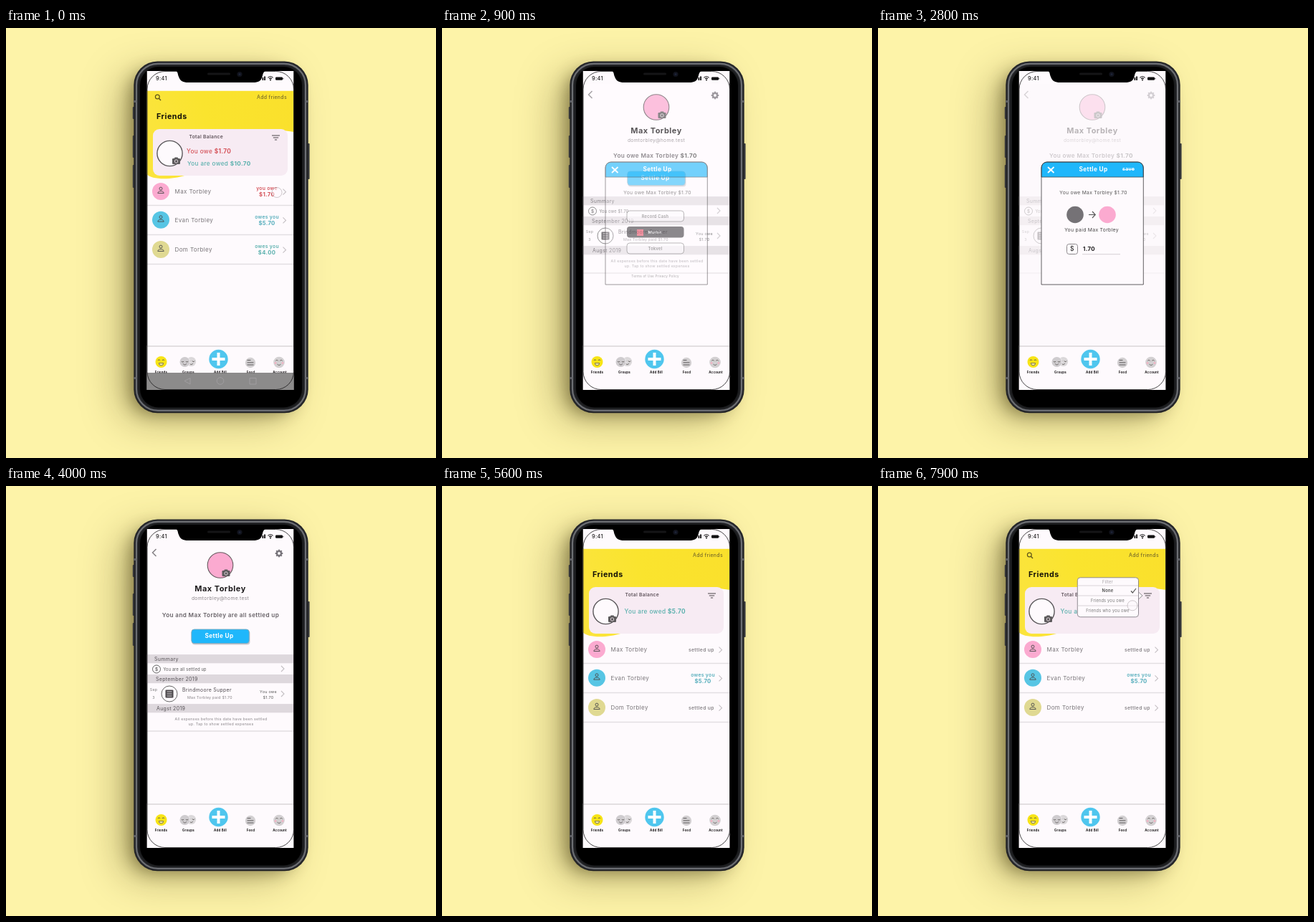
An HTML page with a canvas that plays this animation: 600 px wide and 600 px high, repeating every 8000 ms.

```html
<!DOCTYPE html>
<html lang="en">
<head>
<meta charset="utf-8">
<title>Bill sharing app</title>
<style>
html, body { margin: 0; width: 100%; height: 100%; overflow: hidden; background: #fdf3a8; }
canvas { display: block; width: 100vmin; height: 100vmin; }
</style>
</head>
<body>
<canvas id="stage"></canvas>
<script>
const SIZE = 600, LOOP = 8000, STEP = 100;
const FONT = "Inter, 'Open Sans', sans-serif";
const PAPER = '#fefafd', BLUE = '#1fb7fb', PINK = '#fbaad0', RED = '#d5535a', TEAL = '#5ab0ad';
const MAX = 'Max Torbley', EVAN = 'Evan Torbley', DOM = 'Dom Torbley';

const dpr = window.devicePixelRatio || 1;
const makeCanvas = el => {
  el.width = el.height = SIZE * dpr;
  const g = el.getContext('2d');
  g.scale(dpr, dpr);
  return g;
};
const stage = makeCanvas(document.getElementById('stage'));
const buffer = makeCanvas(document.createElement('canvas'));
const backdrop = makeCanvas(document.createElement('canvas'));
let c = stage;

const ramp = (t, from, to) => Math.min(1, Math.max(0, (t - from) / (to - from)));

// Drawing helpers
function paint(fill, stroke, width = 1) {
  if (fill) { c.fillStyle = fill; c.fill(); }
  if (stroke) { c.strokeStyle = stroke; c.lineWidth = width; c.stroke(); }
}
function circle(x, y, r, fill, stroke, width) {
  c.beginPath();
  c.arc(x, y, r, 0, Math.PI * 2);
  paint(fill, stroke, width);
}
function box(x, y, w, h, r, fill, stroke, width) {
  c.beginPath();
  c.roundRect(x, y, w, h, r);
  paint(fill, stroke, width);
}
function line(points, color, width = 1, fill) {
  c.beginPath();
  for (let i = 0; i < points.length; i += 2) c.lineTo(points[i], points[i + 1]);
  paint(fill, color, width);
}
function arc(x, y, r, from, to, color, width = 0.8) {
  c.beginPath();
  c.arc(x, y, r, from * Math.PI, to * Math.PI);
  paint(null, color, width);
}
function text(str, x, y, size, color = '#666', weight = 400, align = 'left') {
  c.font = `${weight} ${size * 0.96}px ${FONT}`;
  c.letterSpacing = size * 0.043 + 'px';
  c.textAlign = align;
  c.fillStyle = color;
  c.fillText(str, x, y + size * 0.34);
  return x + c.measureText(str).width;
}
const mid = (str, x, y, size, color, weight) => text(str, x, y, size, color, weight, 'center');

function layer(alpha, draw) {
  if (alpha <= 0) return;
  buffer.clearRect(0, 0, SIZE, SIZE);
  c = buffer;
  draw();
  c = stage;
  c.globalAlpha = alpha;
  c.drawImage(buffer.canvas, 0, 0, SIZE, SIZE);
  c.globalAlpha = 1;
}

// Icons
const chevron = (x, y, s = 4, dir = 1, color = '#c4bfc3', w = 1.1) =>
  line([x - dir * s / 2, y - s, x + dir * s / 2, y, x - dir * s / 2, y + s], color, w);

function camera(x, y, color = '#5d5a5c') {
  box(x - 5.5, y - 3.5, 11, 8, 1.2, color);
  box(x - 2.5, y - 5, 5, 3, 1, color);
  circle(x, y + 0.5, 2.2, null, '#e9dde4', 0.9);
}
function person(x, y) {
  circle(x, y - 2.9, 2, null, '#4a4a4a', 0.9);
  c.beginPath();
  c.moveTo(x - 4.2, y + 3.5);
  c.bezierCurveTo(x - 4.2, y - 0.4, x + 4.2, y - 0.4, x + 4.2, y + 3.5);
  c.closePath();
  paint(null, '#4a4a4a', 0.9);
}
function gear(x, y) {
  for (let i = 0; i < 4; i++) {
    const a = i * Math.PI / 4, dx = Math.cos(a) * 5.3, dy = Math.sin(a) * 5.3;
    line([x - dx, y - dy, x + dx, y + dy], '#77737a', 2.2);
  }
  circle(x, y, 3, PAPER, '#77737a', 2.2);
}
function face(x, y, r, fill, { openEyes = true, laugh = false } = {}) {
  circle(x, y, r, fill);
  const ink = '#5a5553', turn = openEyes ? [1.1, 1.9] : [0.1, 0.9];
  for (const dx of [-3, 3]) arc(x + dx, y - 1.5, 1.6, ...turn, ink, 0.9);
  if (laugh) {
    c.beginPath();
    c.arc(x, y + 1.7, 3.1, 0, Math.PI);
    c.closePath();
    paint('#fff6a0', ink, 0.8);
  } else arc(x, y + 1.6, 2.4, 0.1, 0.9, ink);
}

// Phone body and shadow, drawn once
function drawBackdrop() {
  c = backdrop;
  c.fillStyle = '#fdf3a8';
  c.fillRect(0, 0, SIZE, SIZE);
  const shadows = [[-24, 14, 56, 0.36], [-11, 7, 22, 0.46], [-2, 1, 5, 0.25]];
  for (const [dx, dy, blur, a] of shadows) {
    c.shadowColor = `rgba(64,54,14,${a})`;
    c.shadowBlur = blur * dpr;
    c.shadowOffsetX = dx * dpr;
    c.shadowOffsetY = dy * dpr;
    box(184, 52, 232, 480, 30, '#222');
  }
  c.shadowColor = 'transparent';
  const metal = '#3a3b3e';
  for (const [y, h] of [[110, 17], [150, 31], [191, 32]]) box(176.8, y, 3, h, 1, metal);
  box(421, 161, 2.6, 50, 1, metal);
  box(178.3, 46.5, 243.4, 490.7, 33, '#252629');
  box(182, 49.8, 236, 484, 30, null, '#6c6e73', 2.2);
  box(184.6, 52.2, 230.8, 479.2, 28, '#1b1c1e');
  box(187, 54, 226, 475.6, 26, '#000');
  for (const y of [101, 487]) {
    c.fillStyle = '#626367';
    c.fillRect(178.3, y, 4, 3);
    c.fillRect(417.7, y, 4, 3);
  }
}

function drawGlass() {
  box(197, 60.5, 204.5, 444, 25, null, '#1b1a1b', 0.8);
  c.beginPath();
  c.moveTo(234, 59);
  c.bezierCurveTo(241, 60, 239, 64, 241, 68);
  c.bezierCurveTo(243, 74, 247, 76, 254, 76);
  c.lineTo(345, 76);
  c.bezierCurveTo(352, 76, 356, 74, 357.5, 68);
  c.bezierCurveTo(359, 64, 358, 60, 366, 59);
  paint('#000');
  box(281, 62.5, 32, 3, 1.5, '#151517');
  circle(326, 64.5, 3.6, '#11131c');
  circle(326, 64.5, 1.5, '#1d2337');
}

function status() {
  text('9:41', 209, 70.5, 7.7, '#222', 500);
  c.fillStyle = '#111';
  c.fillRect(357.5, 69, 1.8, 4);
  c.fillRect(360.2, 67.5, 1.8, 5.5);
  circle(369, 72.5, 1, '#111');
  arc(369, 72.8, 2.7, 1.25, 1.75, '#111', 1.1);
  arc(369, 72.8, 5, 1.25, 1.75, '#111', 1.1);
  box(376, 68.5, 10, 4.2, 1.3, '#111');
  c.fillRect(386.4, 69.8, 0.9, 1.6);
}

function tabBar() {
  c.fillStyle = PAPER;
  c.fillRect(196.5, 443, 205, 62);
  line([197, 444, 401, 444], '#dad6d9', 1.3);
  face(216.5, 466, 8, '#f7e416', { laugh: true });
  face(258.5, 465.5, 6.6, '#dbd8da', { openEyes: false });
  circle(249.5, 466, 7.6, PAPER);
  face(249.5, 466, 7, '#cfcccf', { openEyes: false });
  circle(296.5, 462, 13.2, '#4fc6ee');
  line([287.5, 462, 305.5, 462], '#fff', 4);
  line([296.5, 453, 296.5, 471], '#fff', 4);
  circle(341, 467, 7.2, '#d3d0d2');
  for (const [y, w] of [[463.5, 5], [466.8, 9], [470, 9]]) line([336.5, y, 336.5 + w, y], '#5d5a5c', 1);
  face(381, 466.5, 7.8, '#d3d0d2');
  for (const dx of [-5, 5]) circle(381 + dx, 467.5, 1.4, '#f0b3c4');
  const labels = [['Friends', 216.5], ['Groups', 254.5], ['Add Bill', 299], ['Feed', 341.5], ['Account', 382]];
  for (const [s, x] of labels) mid(s, x, 480.7, 4.6, '#1c1a1b', 700);
}

function blankScreen() {
  c.fillStyle = PAPER;
  c.fillRect(196.5, 60, 205, 445);
  status();
}

function systemBar() {
  c.fillStyle = 'rgba(112,112,112,.8)';
  c.fillRect(196.5, 481, 205, 24);
  const ink = '#a09da0';
  line([257, 488.5, 249, 492.5, 257, 497, 257, 488.5], ink, 1);
  circle(299, 492.5, 4.8, null, ink, 1);
  box(340, 488.5, 9, 8.5, 0, null, ink, 1);
}

function search() {
  circle(211.3, 96, 2.9, null, '#5f5518', 1.2);
  line([213.4, 98.2, 216, 101], '#5f5518', 1.4);
}

function amount(label, value, y, color) {
  mid(label, 364, y - 4.5, 7.1, color, 600);
  mid(value, 364, y + 4, 8, color, 700);
}
const settled = y => text('settled up', 344, y + 1, 7.1, '#8a868a', 600);

function friends(paid, withSearch) {
  blankScreen();
  const sun = c.createLinearGradient(196, 140, 402, 88);
  sun.addColorStop(0, '#fbe43c');
  sun.addColorStop(0.4, '#fae42e');
  sun.addColorStop(1, '#fae02c');
  c.beginPath();
  c.moveTo(196.5, 87.7);
  c.lineTo(401.5, 87.7);
  c.lineTo(401.5, 145);
  c.bezierCurveTo(380, 141, 330, 140, 300, 170);
  c.bezierCurveTo(275, 195, 260, 207, 228, 210);
  c.bezierCurveTo(212, 211, 201, 209, 196.5, 204);
  paint(sun);
  if (withSearch) search();
  text('Add friends', 350, 97, 7.2, '#776a29', 500);
  text('Friends', 210, 123, 11.2, '#151208', 700);

  box(205, 141, 188, 65, 9, '#f7ebf3');
  text('Total Balance', 255.5, 151.5, 7, '#5c5058', 600);
  for (const [y, w] of [[150, 5.5], [153, 3.7], [156, 1.6]]) line([376.5 - w, y, 376.5 + w, y], '#4d474b', 1.2);
  circle(228.5, 175, 17.6, PAPER, '#5a575a', 1.4);
  camera(237.5, 185.5);
  if (paid) {
    text('$5.70', text('You are owed ', 254.5, 175, 8.6, TEAL, 500), 175, 8.6, TEAL, 700);
  } else {
    text('$1.70', text('You owe ', 252, 172, 8.6, RED, 500), 172, 8.6, RED, 700);
    text('$10.70', text('You are owed ', 253, 189, 8.5, TEAL, 500), 189, 8.5, TEAL, 700);
  }

  const rows = [[MAX, 228, PINK], [EVAN, 267.7, '#57c5e4'], [DOM, 309, '#e0d992']];
  for (const [name, y, color] of rows) {
    circle(216, y, 12, color);
    person(216, y - 1);
    text(name, 235.5, y, 8.4, '#7a767a');
    chevron(388.5, y + 0.7);
  }
  for (const y of [247.5, 288.5, 329.5]) line([197, y, 401, y], '#e2dee2', 1.4);
  amount('owes you', '$5.70', 268.5, '#54adbb');
  if (paid) {
    settled(228);
    settled(309);
  } else {
    amount('you owe', '$1.70', 228, RED);
    amount('owes you', '$4.00', 309, TEAL);
  }
  tabBar();
}

function profile(paid) {
  blankScreen();
  chevron(207, 93, 5, -1, '#858085', 1.5);
  gear(381, 94);
  circle(299, 110.5, 17.8, PINK, '#66595f', 1.1);
  camera(307, 121.5);
  mid(MAX, 299, 143.5, 11.4, '#1e1b1d', 700);
  mid('domtorbley@home.test', 299, 156.7, 7, '#8d888c');
  if (paid) mid(`You and ${MAX} are all settled up`, 299.5, 180, 8.5, '#676267', 600);
  else text('$1.70', text(`You owe ${MAX} `, 239, 178, 8.5, '#676267', 600), 178, 8.5, '#555', 700);

  box(259.5, 201.5, 81, 20, 4, '#cfcbd0');
  box(258.8, 200, 80.5, 19.6, 4, BLUE, '#7fa9bd', 0.9);
  mid('Settle Up', 297.5, 209.5, 8.6, '#fff', 700);

  for (const [s, x, y] of [['Summary', 207, 241.3], ['September 2019', 209, 269.2], ['Augst 2019', 210, 310.3]]) {
    c.fillStyle = '#ded8dd';
    c.fillRect(196.5, y - 6.2, 205, 12.2);
    text(s, x, y, 7.3, '#575257');
  }
  circle(210, 255.5, 5.5, null, '#555', 0.9);
  mid('$', 210.1, 255.5, 6.5, '#444', 500);
  text(paid ? 'You are all settled up' : 'You owe $1.70', 219.5, 256, 5.8, '#555');
  chevron(386, 255);

  mid('Sep', 206, 284, 5.5, '#777');
  mid('3', 206, 295, 5.5, '#777');
  circle(228, 290, 11, null, '#555', 0.9);
  box(222.5, 284.5, 11, 11, 1, '#4a474a');
  for (const y of [287, 290, 293]) line([224.5, y, 231.5, y], PAPER, 0.8);
  text('Brindmoore Supper', 246, 285, 7.2, '#504b50');
  text(`${MAX} paid $1.70`, 253, 295, 5.5, '#858085');
  mid('You owe', 366, 287, 5.7, '#555');
  mid('$1.70', 366, 295, 5.7, '#555');
  chevron(386, 290);

  mid('All expenses before this date have been settled', 300, 325, 5.5, '#8a868a');
  mid('up. Tap to show settled expenses', 300, 332.3, 5.5, '#8a868a');
  line([197, 342, 401, 342], '#e2dee2', 1.3);
  tabBar();
}

function choices() {
  mid(`You owe ${MAX} $1.70`, 300.5, 230, 7, '#555');
  box(258, 255, 79.5, 15, 4, PAPER, '#777', 0.8);
  mid('Record Cash', 297.5, 262.7, 5.9, '#777', 600);
  box(258, 277, 79.5, 15.5, 4, '#454247');
  c.fillStyle = '#e2566b';
  c.fillRect(272, 281, 9, 9);
  mid('Murbit', 297, 285, 5.6, '#fff', 600);
  box(258, 300, 79.5, 15, 4, PAPER, '#777', 0.8);
  mid('Tokvel', 297.5, 307.6, 6, '#777', 600);
  mid('Terms of Use Privacy Policy', 297.5, 346, 4.8, '#777');
}

function payment(value) {
  text('save', 341, 197, 7.3, '#fff', 600);
  line([341, 197.6, 358, 197.6], '#fff', 0.8);
  mid(`You owe ${MAX} $1.70`, 300.5, 230, 7, '#555');
  circle(275, 260.5, 11.8, '#757276');
  line([294, 260.5, 303, 260.5], '#555', 1.1);
  line([299, 256, 303.3, 260.5, 299, 265], '#555', 1.1);
  circle(320, 260.5, 11.8, PINK);
  mid(`You paid ${MAX}`, 298, 281.3, 7.1, '#444');
  box(263.5, 301.5, 15, 14, 3, PAPER, '#8b878b', 1);
  mid('$', 271, 308.3, 9, '#333', 500);
  text(value, 286, 308, 8.2, '#1d1a1c', 700);
  line([285, 315.7, 338, 315.7], '#d5d0d4', 1);
}

const sheetShape = (h, ...style) => box(228, 187, 142.3, h, [8, 8, 0, 0], ...style);

function sheet(t) {
  sheetShape(21, BLUE, '#3b4a52', 0.8);
  sheetShape(171, null, '#3c393c', 0.8);
  line([237, 194, 245.5, 202], '#fff', 1.8);
  line([245.5, 194, 237, 202], '#fff', 1.8);
  mid('Settle Up', 300.5, 197, 8.6, '#fff', 700);
  if (t < 1600) choices();
  else payment('1.70'.slice(0, Math.max(0, Math.floor((t - 2000) / 150))));
}

// The veil and the sheet's white body come in later than its outline and text
function showSheet(t, open) {
  if (open <= 0) return;
  c.fillStyle = `rgba(254,250,253,${0.69 * open ** 2})`;
  c.fillRect(197, 78, 204, 364);
  layer(open ** 3, () => sheetShape(171, PAPER));
  layer(open, () => sheet(t));
}

function filterMenu() {
  line([363.5, 148, 369, 153, 363.5, 158], '#777', 0.8, PAPER);
  box(278.3, 127.8, 85.2, 55, 4, PAPER, '#77727a', 0.8);
  for (const y of [139, 153, 167]) line([278.5, y, 363, y], '#cfcacf', 0.8);
  mid('Filter', 320.5, 134, 5.9, '#a5a0a4');
  mid('None', 320.5, 146, 6, '#444', 600);
  line([353, 146.5, 355.3, 149, 360, 143], '#555', 1.2);
  mid('Friends you owe', 320.5, 160, 5.8, '#777');
  mid('Friends who you owe', 320.5, 174.3, 5.8, '#777');
}

function tap(t, x, y, from, to) {
  if (t < from || t >= to) return;
  circle(x, y, 7, 'rgba(255,250,254,.5)', 'rgba(120,112,118,.4)', 0.9);
}

function scene(t) {
  c = stage;
  c.drawImage(backdrop.canvas, 0, 0, SIZE, SIZE);
  c.save();
  c.beginPath();
  c.rect(196.5, 60, 205, 445);
  c.clip();

  const away = ramp(t, 200, 500), back = ramp(t, 4400, 4800);
  const open = t < 2900 ? ramp(t, 650, 1050) : 1 - ramp(t, 3100, 3500);
  if (away < 1 || back === 1) friends(back === 1, t < 200 || t >= 7600);
  if (t < 200) systemBar();
  if (back < 1) {
    layer(away, () => profile(t >= 3100));
    layer(back, () => friends(true, false));
  }
  showSheet(t, open);
  layer(ramp(t, 7500, 7800), filterMenu);

  tap(t, 378, 229.5, 0, 200);
  tap(t, 318, 211, 500, 700);
  tap(t, 318, 264, 1300, 1600);
  tap(t, 350, 198, 2900, 3100);
  tap(t, 207, 94, 4200, 4500);
  tap(t, 376, 153, 7300, 7600);
  tap(t, 355, 166.8, 7800, 8000);
  c.restore();
  drawGlass();
}

drawBackdrop();
const start = performance.now();
function tick(now) {
  const t = Math.max(0, now - start) % LOOP;
  scene(Math.floor(t / STEP) * STEP);
  requestAnimationFrame(tick);
}
requestAnimationFrame(tick);
</script>
</body>
</html>
```
